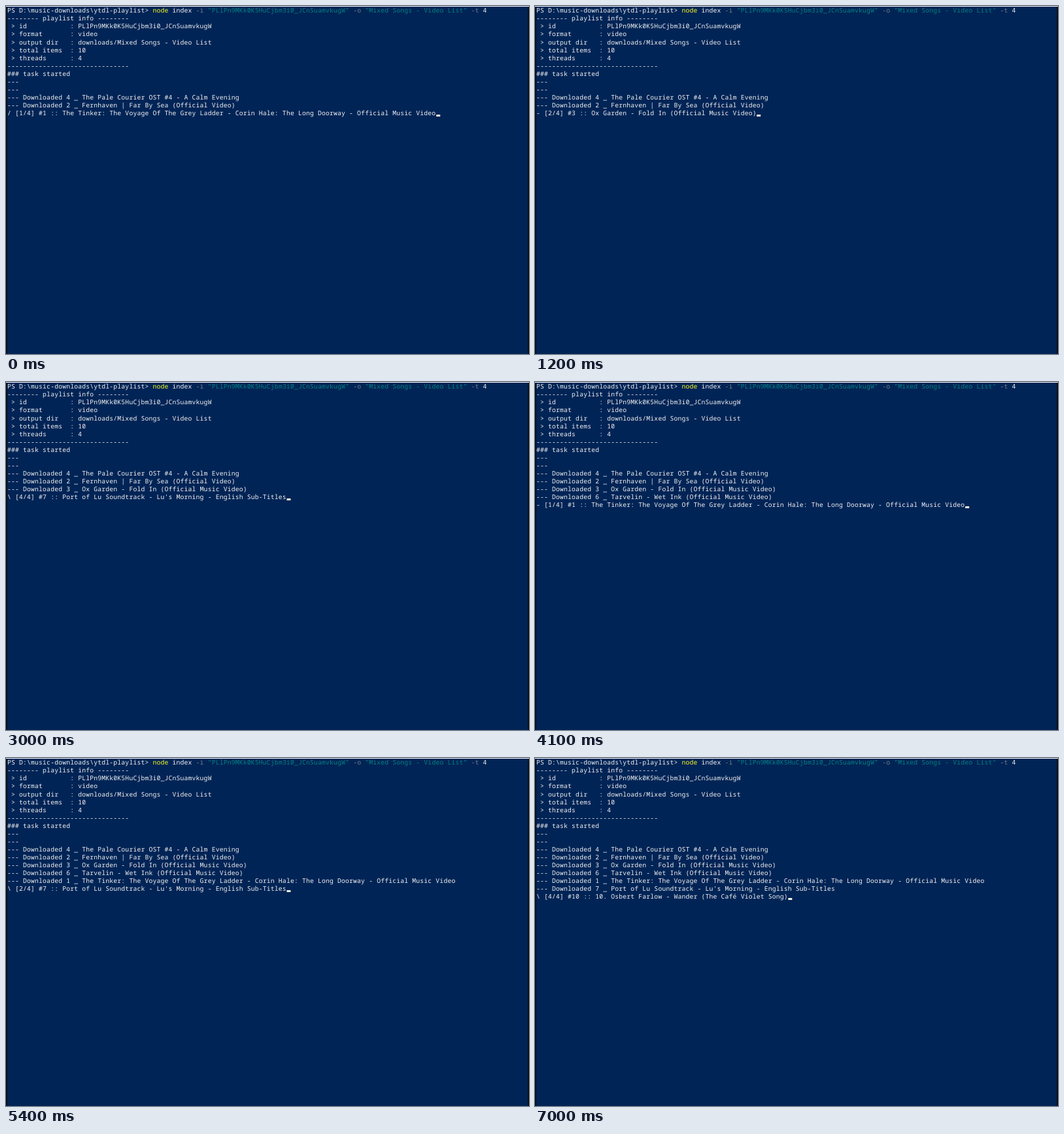
An HTML page for the animation above (7.1 s loop, 800 px wide and 532 px high).

```html
<!DOCTYPE html>
<html lang="en">
<head>
<meta charset="utf-8">
<title>Playlist download</title>
<style>
html, body { margin: 0; width: 100%; height: 100%; overflow: hidden; background: #012456; }
svg { display: block; width: 800px; height: 532px; }
text {
  font: 9.7px "Noto Sans Mono", monospace;
  letter-spacing: 0.2px;
  fill: #f2f2f2;
  white-space: pre;
  text-rendering: geometricPrecision;
  font-variant-ligatures: none;
}
.cmd { fill: #fbf928; }
.opt { fill: #747f88; }
.str { fill: #058080; }
</style>
</head>
<body>
<svg id="stage" viewBox="0 0 800 532">
  <rect width="800" height="532" fill="#012456"/>
  <rect width="2" height="532" fill="#0b0f18"/>
  <rect x="798" width="2" height="532" fill="#0b0f18"/>
  <rect width="800" height="1" fill="#fff"/>
</svg>
<script>
const NS = "http://www.w3.org/2000/svg";
const LOOP = 7100, TICK = 100, LEFT = 2, CELL = 6.02, ROW = 12.03;
const FIRST_LOG = 11;
const stage = document.getElementById("stage");

const titles = {
  1: "The Tinker: The Voyage Of The Grey Ladder - Corin Hale: The Long Doorway - Official Music Video",
  2: "Fernhaven | Far By Sea (Official Video)",
  3: "Ox Garden - Fold In (Official Music Video)",
  4: "The Pale Courier OST #4 - A Calm Evening",
  5: "Dale Farrow - I Left A Coat In Tunis (Original)",
  6: "Tarvelin - Wet Ink (Official Music Video)",
  7: "Port of Lu Soundtrack - Lu's Morning - English Sub-Titles",
  8: "Quillmarsh - Slow River (Official Video)",
  9: "Brindle Row - Paper Hill (Official Video)",
  10: "10. Osbert Farlow - Wander (The Café Violet Song)"
};

// Tick at which each download is logged
const finished = [
  { id: 4, at: 0 }, { id: 2, at: 0 }, { id: 3, at: 22 },
  { id: 6, at: 37 }, { id: 1, at: 50 }, { id: 7, at: 65 }
];

const baseline = row => Math.round(10.4 + row * ROW);

function add(tag, attrs, parent = stage) {
  const el = document.createElementNS(NS, tag);
  for (const key in attrs) el.setAttribute(key, attrs[key]);
  return parent.appendChild(el);
}

function line(row, str = "") {
  const el = add("text", { x: LEFT, y: baseline(row) });
  el.textContent = str;
  return el;
}

const prompt = line(0);
[
  ["", "PS D:\\music-downloads\\ytdl-playlist> "],
  ["cmd", "node "],
  ["", "index "],
  ["opt", "-i "],
  ["str", '"PLlPn9MKk0K5HuCjbm3i0_JCnSuamvkugW" '],
  ["opt", "-o "],
  ["str", '"Mixed Songs - Video List" '],
  ["opt", "-t "],
  ["", "4"]
].forEach(([cls, str]) => {
  add("tspan", { class: cls }, prompt).textContent = str;
});

const info = (key, value) => (" > " + key).padEnd(16) + ": " + value;
[
  "-------- playlist info --------",
  info("id", "PLlPn9MKk0K5HuCjbm3i0_JCnSuamvkugW"),
  info("format", "video"),
  info("output dir", "downloads/Mixed Songs - Video List"),
  info("total items", 10),
  info("threads", 4),
  "-".repeat(31),
  "### task started",
  "---",
  "---"
].forEach((str, i) => line(i + 1, str));

const logs = finished.map(({ id }, i) =>
  line(FIRST_LOG + i, `--- Downloaded ${id} _ ${titles[id]}`));
const status = line(0);
const cursor = add("rect", { width: 6, height: 3, fill: "#f3f1e4" });

function activeAt(tick) {
  const active = [1, 2, 3, 4];
  let next = 5;
  for (const { id, at } of finished) {
    if (at > tick) break;
    active.splice(active.indexOf(id), 1);
    active.push(next++);
  }
  return active;
}

function draw(time) {
  const tick = Math.floor((time % LOOP) / TICK);
  const turn = Math.floor((tick + 5) / 10);
  const slot = turn % 4;
  const id = activeAt(tick)[slot];
  const spin = "/-\\|"[(tick + (turn === 1 ? 1 : 0)) % 4];
  const done = finished.filter(f => f.at <= tick).length;
  const str = `${spin} [${slot + 1}/4] #${id} :: ${titles[id]}`;
  const y = baseline(FIRST_LOG + done);

  logs.forEach((el, i) => el.setAttribute("visibility", i < done ? "visible" : "hidden"));
  status.textContent = str;
  status.setAttribute("y", y);
  cursor.setAttribute("x", LEFT + str.length * CELL);
  cursor.setAttribute("y", y - 1);
}

const start = performance.now();
function loop() {
  draw(performance.now() - start);
  requestAnimationFrame(loop);
}
draw(0);
requestAnimationFrame(loop);
</script>
</body>
</html>
```
